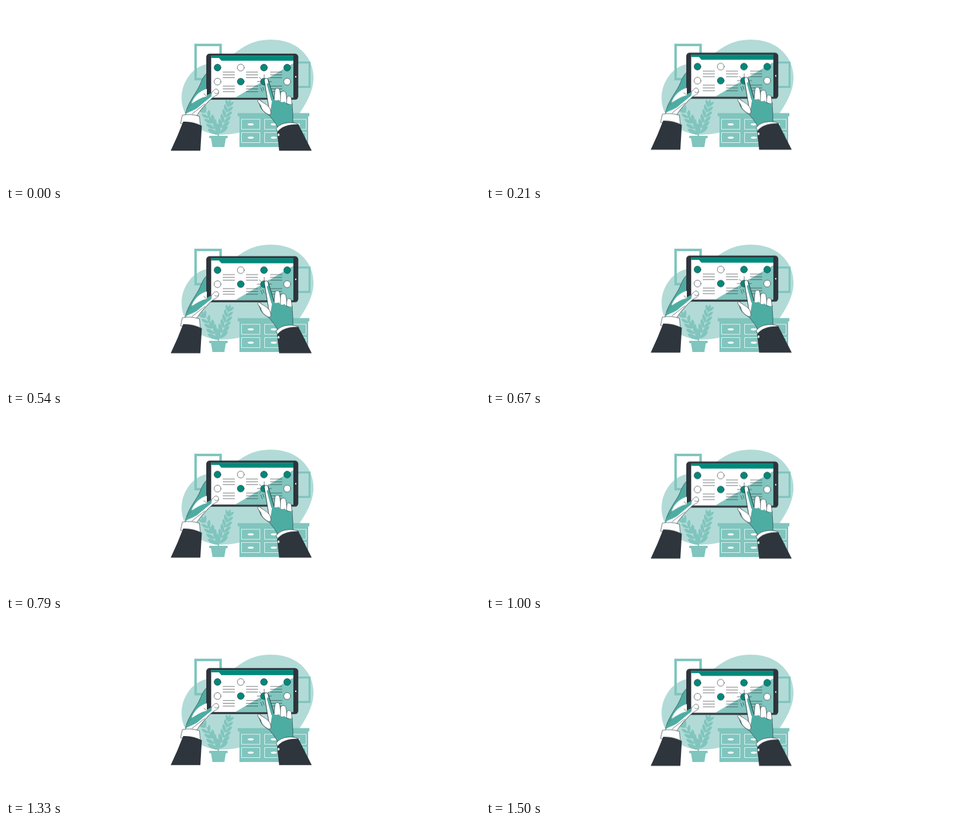
Recreate the animation shown at these times as an HTML page. Size 800 by 300 pixels, loop 1540 ms.

```html
<!DOCTYPE html>
<html lang="en">
<head>
<meta charset="utf-8">
<title>Tablet in hands</title>
<style>
  html, body { margin: 0; width: 100%; height: 100%; overflow: hidden; background: #fff; }
  svg { display: block; width: 800px; height: 300px; }
  .blob { fill: #b2dbd7; }
  .prop { fill: #80c5be; }
  .wall { fill: none; stroke: #80c5be; }
  .stem { fill: none; stroke: #80c5be; stroke-width: 1; }
  .drawer { fill: none; stroke: #e4f3f1; stroke-width: 1; }
  .dark { fill: #2e353c; }
  .teal { fill: #00897b; }
  .skin { fill: #4dada3; }
  .white { fill: #fff; }
  .ink { stroke: #2e353c; stroke-width: .7; stroke-linejoin: round; stroke-linecap: round; }
  .line { fill: none; }
</style>
</head>
<body>
<svg viewBox="0 0 800 300">
  <path class="blob" d="M296.3 156C296.3 128 316 101 342 98C368 97 379 84 397 72C412 62 428 57 447 57C490 57 519 84 519 123C518.5 146 505 168 494 184L440 205C415 205 398 218 364 218C324 218 296.3 190 296.3 156Z"/>
  <rect class="wall" x="320" y="66" width="42.2" height="58" stroke-width="4.2"/>
  <rect class="wall" x="470" y="95.8" width="42.3" height="41.4" stroke-width="3.4"/>

  <g id="plant">
    <path class="stem" d="M358 221C356 205 346 190 334 174M359 221C358 204 373 184 378 161M359 221Q357 205 347 190"/>
  </g>
  <path class="prop" d="M343 220H374V224H371L368.5 239H348.5L346 224H343Z"/>

  <g id="cabinet">
    <path class="prop" d="M391 181.5H512V187H510V239H394V187H391Z"/>
  </g>

  <g id="float">
    <path class="skin ink" d="M340 113C335 117 332 122 328 132C323 145 307 163 303 182L310 186H320L345 158Z"/>

    <rect class="dark" x="338" y="80.8" width="155.3" height="78" rx="5.5"/>
    <rect class="white" x="346.3" y="84.3" width="138.7" height="71"/>
    <path class="prop" d="M485 97V155.3H387Z"/>
    <path class="teal" d="M346.3 84.3H485V92.8H363.5L359.5 88H346.3Z"/>
    <circle class="white" cx="489" cy="120" r="1.2"/>
    <g id="screen"></g>
    <path class="ink line" d="M435.8 116.5V122M424 128.2H429M443 128.2H448M427.5 121L430.5 123.5M444 121L441.5 123.5M428 135.5L430.5 133M430 138.5L432.5 145M433.5 137.5L435.5 143"/>

    <!-- left hand -->
    <path class="white ink" d="M338 142C329 147 320 156 314 165L304 179L303 186L322 186C326 179 331 173 337 167C342 161 347 156 353 152.5C358 151 360 147 358.5 143.5C357 140 353 140 350.5 143L346 148L337 153Z"/>
    <path class="skin" d="M347.5 147C340 151 327 156 314.5 165L304 178L303.3 183C309 179 318 177 324 172C331 166 338 160 346.5 153.5Z"/>
    <path class="white" d="M313 165.5C317 153 328 143 339 140.5V153C329 155 320 160 313 165.5Z"/>
    <path class="ink line" d="M352 147C354 149 357 149 358.5 147M314 183C323 176 330 170 336 166M334 149L338 152"/>
    <path class="white ink" d="M298 185Q312 182 326.5 187L328 203L295 199Z"/>
    <path class="dark" d="M299 196Q315 195 330.5 203L328 245.2H278Q290 220 299 196Z"/>

    <!-- right hand -->
    <path class="skin ink" d="M436 126C437 122 441 121 442.5 125L452.5 158L483 165C483 175 485 187 484 196L489 201L459 209C458 201 450 193 445 186C437 181 430 176 428 167C425 162 425 158 428 159C433 164 440 168 444 174Z"/>
    <path class="white" d="M436.2 126C437.5 122 441 122 442 126L443 134L449.5 158L446.5 176L444 173Z"/>
    <path class="skin" d="M440 132L443.5 130L452.5 159L448 161Z"/>
    <path class="ink line" d="M442.5 125L452.5 158M436 126L443.5 172"/>
    <path class="white ink" d="M425 162C424 158 428 158 430 161C436 165 442 168 445 173C448 180 448 185 443 184C435 180 431 175 430 169Z"/>
    <path class="white ink" d="M452.5 160L454 143C455 138 461 138 462 143L465 162Z"/>
    <path class="white ink" d="M463 163L463.5 148C464.5 143 471 143 472.5 148L475 165Z"/>
    <path class="white ink" d="M473.5 165L474 156C475 151 480.5 152 481.5 156L483 168Z"/>
    <path class="skin" d="M450 158L456 160.5L460 159L465 164L470 162L475 167L483 166V173H450Z"/>
    <path class="white ink" d="M456 208C462 199 475 196 489 198.5L494 201L460 215Z"/>
    <path class="dark" d="M457.5 214C464 204 478 200 493.5 200.5L516 245.2H461Z"/>
    <ellipse class="white" cx="460" cy="218.3" rx="1.5" ry="2.3"/>
  </g>
</svg>
<script>
const byId = id => document.getElementById(id);

function add(parent, tag, attrs) {
  const el = document.createElementNS('http://www.w3.org/2000/svg', tag);
  for (const key in attrs) el.setAttribute(key, attrs[key]);
  parent.appendChild(el);
}

const leaf = (x, y, angle, size) => add(byId('plant'), 'path', {
  class: 'prop',
  d: `M0 0C${size * .3} ${-size * .26} ${size * .8} ${-size * .26} ${size} 0C${size * .75} ${size * .2} ${size * .3} ${size * .2} 0 0Z`,
  transform: `translate(${x} ${y}) rotate(${angle})`
});

// Paired leaves along a branch, smaller towards the tip.
function branch(x0, y0, x1, y1, pairs, bend) {
  const lean = Math.atan2(y1 - y0, x1 - x0) * 180 / Math.PI;
  for (let i = 0; i < pairs; i++) {
    const k = i / (pairs - 1);
    const x = x0 + (x1 - x0) * k + bend * Math.sin(Math.PI * k);
    const y = y0 + (y1 - y0) * k;
    leaf(x, y, lean - 32, 18 - 5 * k);
    leaf(x, y, lean + 32, 18 - 5 * k);
  }
  leaf(x1, y1, lean, 13);
}
branch(356, 217, 336, 181, 5, 2);
branch(361, 216, 375, 171, 6, 1);
branch(358, 218, 349, 199, 2, 0);

for (const y of [192, 214.5]) {
  for (const x of [397.5, 436.5, 475.5]) {
    add(byId('cabinet'), 'rect', { class: 'drawer', x, y, width: 31, height: 17 });
    add(byId('cabinet'), 'ellipse', { class: 'white', cx: x + 15.5, cy: y + 8.6, rx: 5.2, ry: 1.9 });
  }
}

const rows = ['1011', '0110'];
rows.forEach((row, r) => [...row].forEach((on, c) => {
  const cx = 357 + c * 39.2, cy = 104.4 + r * 23.8;
  add(byId('screen'), 'circle', { class: (on === '1' ? 'teal' : 'white') + ' ink', cx, cy, r: 5.8 });
  if (c === 3) return;
  const x = cx + 9.3 + (c === 2 ? 1.5 : 0);
  for (let i = 0; i < 3; i++) {
    add(byId('screen'), 'path', { class: 'ink line', d: `M${x} ${cy + 7.6 + i * 4.7}h19.5` });
  }
}));

// [time in ms, vertical shift in px]
const loop = 1540;
const steps = [[0, 0], [730, -5.7], [1500, .3], [loop, 0]];
byId('float').animate(
  steps.map(([t, y]) => ({ offset: t / loop, transform: `translateY(${y}px)` })),
  { duration: loop, iterations: Infinity, easing: 'linear' }
);
</script>
</body>
</html>
```
